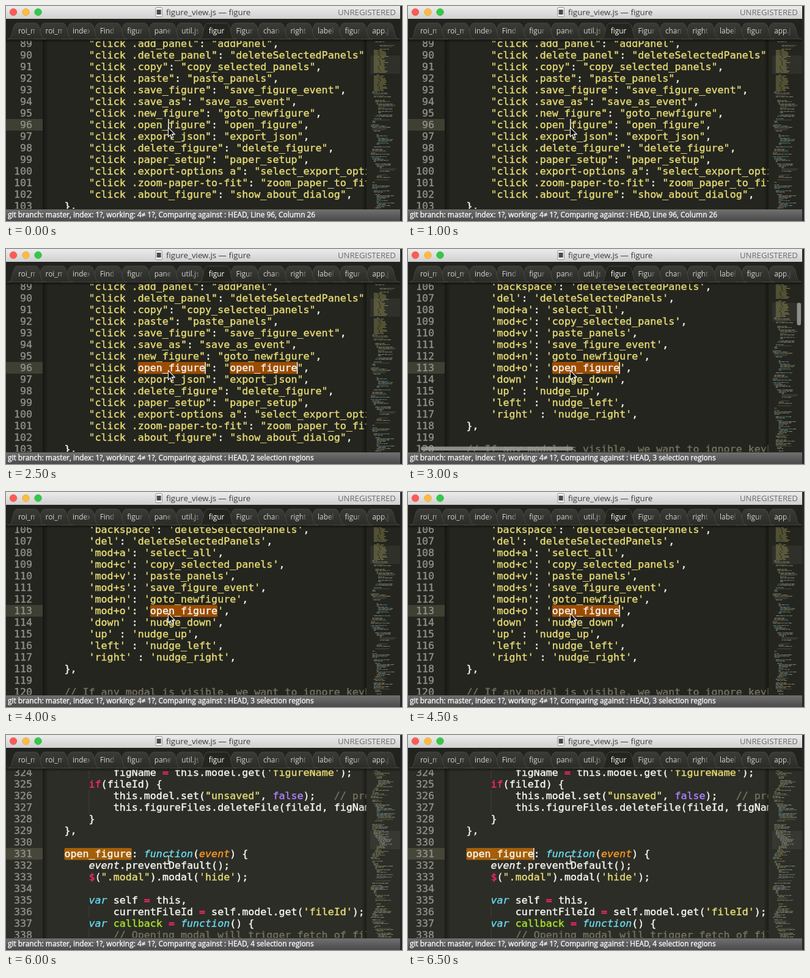
These frames come from a looping animation (648x352 px, 7 s). An HTML page:

```html
<!DOCTYPE html>
<html lang="en">
<head>
<meta charset="utf-8">
<title>Editor multi-select</title>
<style>
html, body { margin: 0; width: 100%; height: 100%; overflow: hidden; background: #24251f; }
svg { display: block; width: 648px; height: 352px; }
text { white-space: pre; }
.code { font: 16.66px "DejaVu Sans Mono", monospace; color: #f8f8f2; }
.code, .code tspan { fill: currentColor; stroke: currentColor; stroke-width: .4px; }
.ui { font-family: "Open Sans", "Noto Sans", sans-serif; }
</style>
</head>
<body>
<svg id="stage" viewBox="0 0 648 352" xmlns="http://www.w3.org/2000/svg">
  <defs>
    <linearGradient id="titleFill" x2="0" y2="1"><stop stop-color="#ececec"/><stop offset="1" stop-color="#d0d0d0"/></linearGradient>
    <linearGradient id="tabFill" x2="0" y2="1"><stop stop-color="#3a3a36"/><stop offset="1" stop-color="#2b2b27"/></linearGradient>
    <linearGradient id="statusFill" x2="0" y2="1"><stop stop-color="#707070"/><stop offset="1" stop-color="#4a4a4a"/></linearGradient>
    <linearGradient id="shadeX"><stop stop-opacity=".4"/><stop offset="1" stop-opacity="0"/></linearGradient>
    <linearGradient id="shadeRight"><stop stop-opacity="0"/><stop offset="1" stop-opacity=".4"/></linearGradient>
    <linearGradient id="shadeY" x2="0" y2="1"><stop stop-opacity=".5"/><stop offset="1" stop-opacity="0"/></linearGradient>
    <linearGradient id="labelFade"><stop offset=".65" stop-color="#d4d4d0"/><stop offset="1" stop-color="#d4d4d0" stop-opacity=".15"/></linearGradient>
    <clipPath id="codeClip"><rect x="61" y="57" width="529" height="275"/></clipPath>
    <clipPath id="gutterClip"><rect y="57" width="61" height="275"/></clipPath>
    <clipPath id="mapClip"><rect x="596" y="58" width="49" height="274"/></clipPath>
    <clipPath id="labelClip" clipPathUnits="userSpaceOnUse"><rect x="-2" y="24" width="30" height="30"/></clipPath>
  </defs>
  <rect id="back" y="54" width="648" height="279"/>
  <rect y="185" width="60" height="19" fill="#fff6c0" opacity=".12"/>
  <g id="gutter" clip-path="url(#gutterClip)"></g>
  <g id="pages" clip-path="url(#codeClip)"></g>
  <g id="marks"></g>
  <g id="maps" clip-path="url(#mapClip)"></g>
  <rect x="60" y="54" width="9" height="279" fill="url(#shadeX)"/>
  <rect x="582" y="54" width="8" height="279" fill="url(#shadeRight)"/>
  <rect y="54" width="648" height="6" fill="url(#shadeY)"/>
  <g id="bars" fill="#a0a09c" fill-opacity=".85">
    <rect x="21" y="323.5" width="249" height="6.5" rx="3.2"/>
    <rect id="thumb" x="636.5" width="6.5" height="37" rx="3.2"/>
  </g>
  <path id="arrow" d="M265.5 199v15l3.5-3.2 2.3 5.2 2.4-1-2.3-5.1h4.8z" fill="#000" stroke="#fff" stroke-width="1.1"/>
  <path id="beam" d="M263.5 197.5q2.5 0 2.5 2v10q0 2-2.5 2M268.5 197.5q-2.5 0-2.5 2v10q0 2 2.5 2M264.5 206h3" fill="none" stroke="#f4f4f0" stroke-width="1.2"/>
  <g id="chrome" class="ui">
    <rect width="648" height="21" fill="url(#titleFill)"/>
    <circle cx="12" cy="10" r="5.8" fill="#fc5b57" stroke="#df4843" stroke-width=".6"/>
    <circle cx="32.5" cy="10" r="5.8" fill="#fdbc40" stroke="#dd9d33" stroke-width=".6"/>
    <circle cx="52.5" cy="10" r="5.8" fill="#34c84a" stroke="#27aa35" stroke-width=".6"/>
    <rect x="245" y="2.5" width="10.5" height="15" rx="1" fill="#fafafa" stroke="#777" stroke-width=".8"/>
    <rect x="246.7" y="6" width="7" height="8" fill="#4a4a4a"/>
    <text x="262" y="15" font-size="13.3" fill="#3c3c3c">figure_view.js — figure</text>
    <text x="543" y="14.5" font-size="13.15" fill="#6c6c6c">UNREGISTERED</text>
    <rect y="21" width="648" height="33" fill="#22221f"/>
    <g id="tabs"></g>
    <rect y="333" width="648" height="19" fill="url(#statusFill)"/>
    <text id="status" x="3" y="346.4" font-size="11.9" fill="#fff" stroke="#fff" stroke-width=".3"></text>
  </g>
  <rect x="645" width="3" height="352" fill="#262626"/>
</svg>
<script>
const $ = id => document.getElementById(id);
const CHAR = 10.03, LEFT = 55.3, ROW = 19, MID = 194;

function add(parent, tag, attrs, text) {
  const el = document.createElementNS('http://www.w3.org/2000/svg', tag);
  for (const k in attrs) el.setAttribute(k, attrs[k]);
  if (text !== undefined) el.textContent = text;
  parent.appendChild(el);
  return el;
}
const show = (el, on) => el.setAttribute('visibility', on ? 'visible' : 'hidden');
const colX = col => LEFT + col * CHAR;

const clicks = [
  ['add_panel', 'addPanel'], ['delete_panel', 'deleteSelectedPanels'],
  ['copy', 'copy_selected_panels'], ['paste', 'paste_panels'],
  ['save_figure', 'save_figure_event'], ['save_as', 'save_as_event'],
  ['new_figure', 'goto_newfigure'], ['open_figure', 'open_figure'],
  ['export_json', 'export_json'], ['delete_figure', 'delete_figure'],
  ['paper_setup', 'paper_setup'], ['export-options a', 'select_export_option'],
  ['zoom-paper-to-fit', 'zoom_paper_to_fit'], ['about_figure', 'show_about_dialog']
].map(([k, v]) => `        "click .${k}": "${v}",`);

const keys = [
  ["'backspace':", 'deleteSelectedPanels'], ["'del':", 'deleteSelectedPanels'],
  ["'mod+a':", 'select_all'], ["'mod+c':", 'copy_selected_panels'],
  ["'mod+v':", 'paste_panels'], ["'mod+s':", 'save_figure_event'],
  ["'mod+n':", 'goto_newfigure'], ["'mod+o':", 'open_figure'],
  ["'down' :", 'nudge_down'], ["'up' :", 'nudge_up'],
  ["'left' :", 'nudge_left'], ["'right' :", 'nudge_right']
].map(([k, v]) => `        ${k} '${v}',`);

const body = `            figName = this.model.get('figureName');
        if(fileId) {
            this.model.set("unsaved", false);   // prevent
            this.figureFiles.deleteFile(fileId, figName);
        }
    },

    open_figure: function(event) {
        event.preventDefault();
        $(".modal").modal('hide');

        var self = this,
            currentFileId = self.model.get('fileId');
        var callback = function() {
            // Opening modal will trigger fetch of files`.split('\n');

const pages = [
  { first: 89, cur: 96, mapY: 96, lines: [...clicks, '    },'] },
  { first: 106, cur: 113, mapY: 103, thumbY: 88,
    lines: [...keys, '    },', '', '    // If any modal is visible, we want to ignore keyboard'] },
  { first: 324, cur: 331, mapY: 172, thumbY: 150, lines: body }
];

const TOKEN = /\/\/.*|"[^"]*"|'[^']*'|\w+|\s+|./g;
const WORDS = {
  var: '#66d9ef', function: '#66d9ef', if: '#f92672', '=': '#f92672',
  $: '#f92672', false: '#ae81ff', callback: '#a6e22e'
};

function style(tok, before) {
  if (tok.startsWith('//')) return { color: '#75715e' };
  if (/^["']/.test(tok)) return { color: '#e6db74' };
  const s = WORDS[tok] ? { color: WORDS[tok] } : {};
  if (tok === 'event' && before.endsWith('(')) s.color = '#fd971f';
  if (/^(var|function|event)$/.test(tok)) s['font-style'] = 'italic';
  return s;
}

function codeLine(parent, line, y) {
  const indent = line.search(/\S/);
  if (indent >= 12)
    add(parent, 'path', { d: `M${colX(indent - 4) + 0.5} ${y - 15}v${ROW}`, stroke: '#55564c', 'stroke-dasharray': '1 1' });
  const el = add(parent, 'text', { class: 'code', x: LEFT, y });
  for (const m of line.matchAll(TOKEN))
    add(el, 'tspan', style(m[0], line.slice(0, m.index)), m[0]);
}

// Minimap: each line number gives the same strokes on every page.
const rnd = n => { const v = Math.sin(n * 12.9898) * 43758.5453; return v - Math.floor(v); };
const INK = ['#f8f8f2', '#f8f8f2', '#f8f8f2', '#66d9ef', '#e6db74', '#f8f8f2', '#e6db74'];

function mapRow(parent, n, y) {
  const put = (col, len, fill) => add(parent, 'rect',
    { x: 597 + col * 0.6, y, width: len * 0.6, height: 1.2, fill, opacity: 0.4 });
  if ((n > 83 && n < 103) || (n > 104 && n < 118)) {
    const a = 10 + rnd(n) * 8;
    put(8, a, '#e6db74');
    put(10 + a, 8 + rnd(n + 7) * 14, '#e6db74');
    return;
  }
  if (rnd(n) < 0.2) return;
  let col = 8 + 4 * Math.round(2 * Math.sin(n / 4) + rnd(Math.floor(n / 6)) * 2);
  if (rnd(n + 3) < 0.14) return put(col, 20 + rnd(n + 5) * 28, '#75715e');
  const parts = 1 + Math.floor(rnd(n + 9) * 5);
  for (let i = 0; i < parts; i++) {
    const len = 3 + rnd(n * 3 + i) * 8;
    put(col, len, INK[Math.floor(rnd(n * 5 + i) * INK.length)]);
    col += len + 1.5;
  }
}

for (const p of pages) {
  p.nums = add($('gutter'), 'g', {});
  p.code = add($('pages'), 'g', {});
  p.map = add($('maps'), 'g', {});
  p.lines.forEach((line, i) => {
    const n = p.first + i, y = MID + (n - p.cur) * ROW + 6;
    add(p.nums, 'text', { class: 'code', x: 43, y, 'text-anchor': 'end', style: 'color:#8f908a' }, n);
    codeLine(p.code, line, y);
  });
  add(p.map, 'rect', { x: 596, y: p.mapY - 15, width: 49, height: 30, fill: '#fff', opacity: 0.05 });
  for (let y = 58; y < 332; y += 2) mapRow(p.map, p.cur + Math.round((y - p.mapY) / 2), y);
}

function selection(col) {
  const g = add($('marks'), 'g', {}), x = colX(col);
  add(g, 'rect', { x, y: 185, width: 11 * CHAR, height: 19.5, rx: 2 });
  add(g, 'text', { class: 'code', x, y: MID + 6 }, 'open_figure');
  return g;
}
const sels = { 16: selection(16), 31: selection(31), 18: selection(18), 4: selection(4) };
const outline = add($('marks'), 'rect', { x: colX(31), y: 185.5, width: 11 * CHAR, height: 18.5, rx: 2, fill: 'none', stroke: '#8d8a6c' });
const carets = [0, 1].map(() => add($('marks'), 'rect', { y: 185, width: 1.5, height: 19.5, fill: '#f8f8f0' }));

const names = ['roi_m', 'roi_m', 'index', 'Find', 'figur', 'pane', 'util.js', 'figur', 'Figur', 'chan', 'right', 'label', 'figur', 'app.j'];
function tab(i, active) {
  const g = add($('tabs'), 'g', { transform: `translate(${20 + i * 44.55})` });
  add(g, 'path', {
    d: 'M-18 54c7 0 7-5 9-13s3-13 9-13h27c6 0 7 5 9 13s2 13 9 13z',
    fill: active ? '#24251f' : 'url(#tabFill)', stroke: '#4c4c47', 'stroke-width': 0.9
  });
  const label = add(g, 'g', { 'clip-path': 'url(#labelClip)' });
  add(label, 'text', { y: 45, 'font-size': 11.85, fill: active ? '#fff' : 'url(#labelFade)' }, names[i]);
}
for (let i = names.length - 1; i >= 0; i--) if (i !== 7) tab(i, false);
tab(7, true);

const STEPS = [
  { at: 0, page: 0, sel: [], caret: [21], note: 'Line 96, Column 26' },
  { at: 1500, page: 0, sel: [16], caret: [27], note: '11 characters selected' },
  { at: 2500, page: 0, sel: [16, 31], caret: [27, 42], note: '2 selection regions' },
  { at: 3000, page: 1, sel: [18], caret: [29], note: '3 selection regions' },
  { at: 5000, page: 2, sel: [4], caret: [15], note: '4 selection regions' }
];
const BLINK_OFF = [1, 4, 8, 10, 12];

function draw(t) {
  const step = STEPS.filter(s => s.at <= t).pop();
  const page = pages[step.page];
  for (const p of pages) [p.nums, p.code, p.map].forEach(g => show(g, p === page));
  for (const col in sels) show(sels[col], step.sel.includes(+col));
  show(outline, step.at === 1500);
  const lit = !BLINK_OFF.includes(Math.floor(t / 500));
  carets.forEach((c, i) => {
    const on = lit && i < step.caret.length;
    if (on) c.setAttribute('x', colX(step.caret[i]) - 0.7);
    show(c, on);
  });
  const scrolled = step.page > 0 && t - step.at < 500;
  if (scrolled) $('thumb').setAttribute('y', page.thumbY);
  show($('bars'), scrolled);
  show($('arrow'), step.page < 2);
  show($('beam'), step.page === 2);
  const pale = t >= 5500;
  $('back').setAttribute('fill', pale ? '#2c2d26' : '#24251f');
  $('marks').setAttribute('fill', pale ? '#a55f08' : '#9c4c02');
  $('status').textContent = 'git branch: master, index: 1?, working: 4≠ 1?, Comparing against : HEAD, ' + step.note;
}

const start = performance.now();
function tick() {
  draw((performance.now() - start) % 7000);
  requestAnimationFrame(tick);
}
tick();
</script>
</body>
</html>
```
